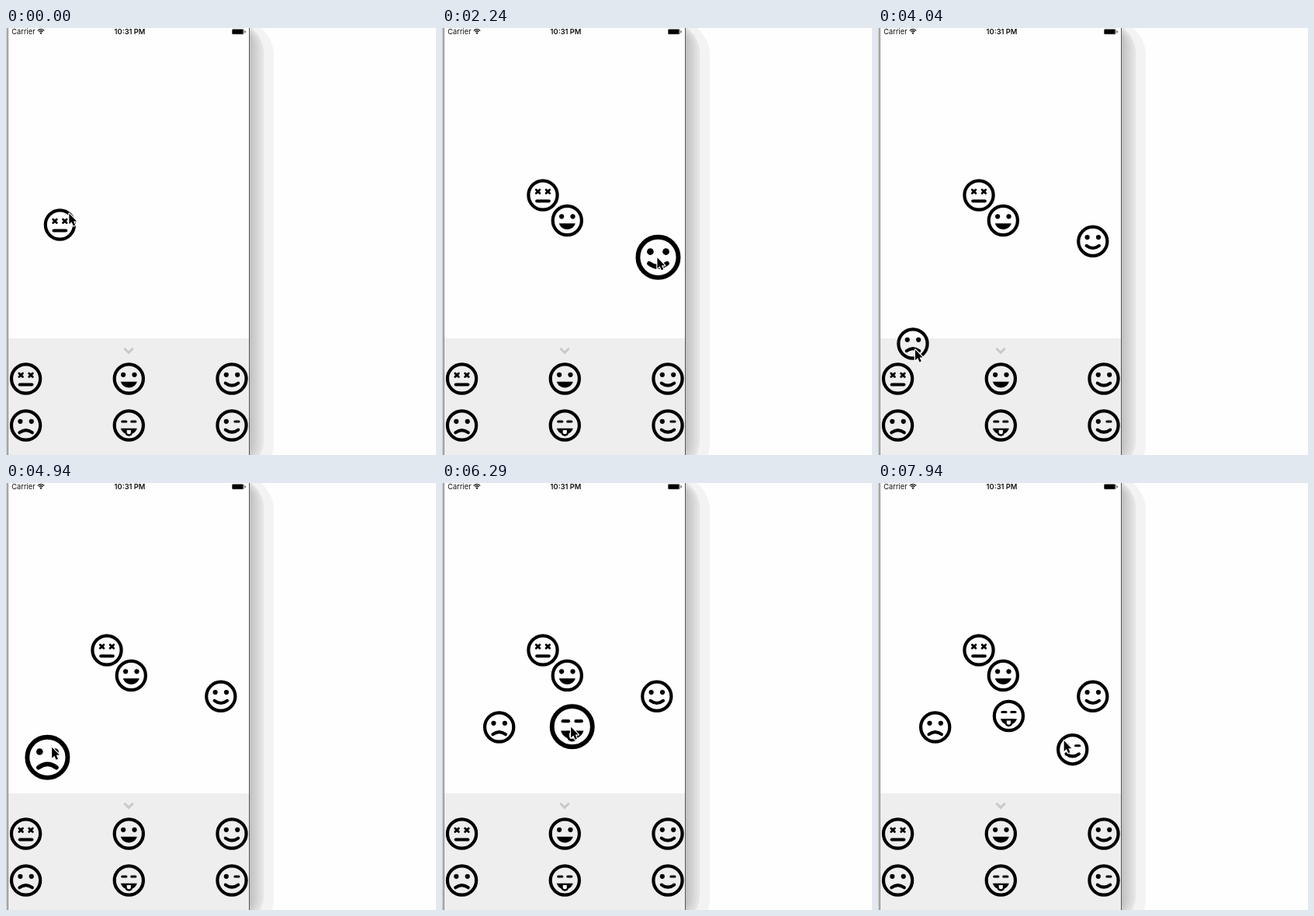
Animation, 554 px wide and 549 px high, one loop 8000 ms. Source, as an HTML page with a canvas:

```html
<!DOCTYPE html>
<html lang="en">
<head>
<meta charset="utf-8">
<title>Emoji drag</title>
<style>
html, body { margin: 0; width: 554px; height: 549px; overflow: hidden; background: #fefefe; }
canvas { display: block; }
</style>
</head>
<body>
<canvas id="stage" width="554" height="549"></canvas>
<script>
const ctx = document.getElementById('stage').getContext('2d');
const LOOP = 8000, TRAVEL = 750;

// Tray slots, three to a row
const kinds = ['dead', 'grin', 'smile', 'sad', 'tongue', 'wink'];
const slot = kind => {
  const i = kinds.indexOf(kind);
  return [25.6 + 132.7 * (i % 3), 451 + 60 * Math.floor(i / 3)];
};

// Each drag carries a face from its slot (or `from`) to a spot.
// `grip` and `release` place the pointer tip relative to the face.
const drags = [
  { kind: 'dead', grab: 0, drop: 290, from: [69.4, 253], to: [130, 215], grip: [11, -15] },
  { kind: 'grin', grab: 900, drop: 1490, to: [161.3, 247.5] },
  { kind: 'smile', grab: 1950, drop: 2390, to: [276.8, 274.3], lift: 0.4 },
  { kind: 'sad', grab: 3300, drop: 3740, to: [45, 406], grip: [-2, -6], release: [2, 7], lift: 0.4 },
  { kind: 'sad', grab: 4800, drop: 5240, from: [45, 406], to: [73.7, 314], grip: [0, -14],
    release: [9, -13], bow: [-7, -4], lift: 0.4 },
  { kind: 'tongue', grab: 5850, drop: 6440, to: [168.4, 299.5], grip: [-11, 0], lift: 0.4 },
  { kind: 'wink', grab: 7200, drop: 7940, to: [250.7, 342.7], grip: [-5, -10], release: [-12, -12], lift: 0.4 }
].map(d => ({ from: slot(d.kind), grip: [-2, 0], release: [-2, 0], bow: [0, 0], lift: 0, ...d }));

const clamp = p => Math.min(1, Math.max(0, p));
const easeOut = p => 1 - (1 - p) ** 2;
const smooth = p => p * p * (3 - 2 * p);
const add = (a, b) => [a[0] + b[0], a[1] + b[1]];
const glide = (a, b, p, bow = [0, 0]) =>
  a.map((v, i) => v + (b[i] - v) * p + bow[i] * Math.sin(Math.PI * p));

const progress = (d, t) => easeOut(clamp((t - d.grab) / (d.drop - d.grab)));
const place = (d, t) => glide(d.from, d.to, progress(d, t), d.bow);

function pointerAt(t) {
  const i = drags.findLastIndex(d => d.grab <= t);
  const now = drags[i], next = drags[i + 1];
  const tip = add(place(now, t), glide(now.grip, now.release, progress(now, t)));
  if (t <= now.drop || !next) return tip;
  const leave = Math.max(now.drop, next.grab - TRAVEL);
  const p = clamp((t - leave) / (next.grab - leave));
  return glide(tip, add(next.from, next.grip), smooth(p), [24, 24]);
}

function line(width, ...pts) {
  ctx.lineWidth = width;
  ctx.beginPath();
  pts.forEach(([x, y]) => ctx.lineTo(x, y));
  ctx.stroke();
}

function dot(x, y, r) {
  ctx.beginPath();
  ctx.arc(x, y, r, 0, Math.PI * 2);
  ctx.fill();
}

function pill(color, x, y, w, h, r) {
  ctx.fillStyle = color;
  ctx.beginPath();
  ctx.roundRect(x, y, w, h, r);
  ctx.fill();
}

function curve(y, bend) {
  ctx.lineWidth = 4.1;
  ctx.beginPath();
  ctx.moveTo(-8.2, y);
  ctx.quadraticCurveTo(0, y + bend, 8.2, y);
  ctx.stroke();
}

const eye = x => dot(x, -5.2, 3.1);
const eyes = () => { eye(-7.2); eye(7.2); };
const dash = x => line(3, [x - 2.6, -5], [x + 2.6, -5]);

function cross(x, y) {
  const r = 2.3;
  line(2.8, [x - r, y - r], [x + r, y + r]);
  line(2.8, [x + r, y - r], [x - r, y + r]);
}

function openMouth() {
  ctx.beginPath();
  ctx.moveTo(-10.5, 3.8);
  ctx.lineTo(10.5, 3.8);
  ctx.bezierCurveTo(7.5, 14, -7.5, 14, -10.5, 3.8);
  ctx.fill();
}

const features = {
  dead() { cross(-6.4, -4.8); cross(6.4, -4.8); line(4.1, [-7.8, 7.5], [7.8, 7.5]); },
  grin() { eyes(); openMouth(); },
  smile() { eyes(); curve(5.6, 6.2); },
  sad() { eyes(); curve(9.2, -6.2); },
  tongue() {
    dash(-6); dash(6);
    openMouth();
    pill('#000', -5, 4, 10, 9.8, [0, 0, 5, 5]);
    pill('#f6f6f6', -2.6, 6, 5.2, 5.2, [0, 0, 2.6, 2.6]);
  },
  wink() { eye(-7.2); dash(6.4); curve(5.6, 6.2); }
};

function face(kind, [x, y], scale = 1) {
  ctx.save();
  ctx.translate(x, y);
  ctx.scale(scale, scale);
  ctx.fillStyle = ctx.strokeStyle = '#000';
  ctx.lineCap = 'round';
  ctx.lineWidth = 4.2;
  ctx.beginPath();
  ctx.arc(0, 0, 18.6, 0, Math.PI * 2);
  ctx.stroke();
  features[kind]();
  ctx.restore();
}

function arrow([x, y]) {
  ctx.save();
  ctx.translate(x + 0.5, y + 0.5);
  ctx.scale(0.92, 0.92);
  ctx.beginPath();
  [[0.5, 0], [0.5, 15], [4, 11.8], [6.4, 17.4], [9, 16.3], [6.6, 10.8], [11, 10.8]]
    .forEach(p => ctx.lineTo(...p));
  ctx.closePath();
  ctx.lineJoin = 'round';
  ctx.lineWidth = 2.6;
  ctx.strokeStyle = '#fff';
  ctx.stroke();
  ctx.fillStyle = '#000';
  ctx.fill();
  ctx.restore();
}

function box(color, x, y, w, h) {
  ctx.fillStyle = color;
  ctx.fillRect(x, y, w, h);
}

function label(text, x, align, weight) {
  ctx.textAlign = align;
  ctx.font = `${weight} 9.3px Inter, "Liberation Sans", sans-serif`;
  ctx.fillText(text, x, 8);
}

function statusBar() {
  ctx.fillStyle = ctx.strokeStyle = '#111';
  label('Carrier', 7.3, 'left', 400);
  label('10:31 PM', 159.5, 'center', 600);
  ctx.lineCap = 'butt';
  ctx.lineWidth = 1.3;
  for (const r of [3.2, 5.5]) {
    ctx.beginPath();
    ctx.arc(45, 7.2, r, -Math.PI * 0.77, -Math.PI * 0.23);
    ctx.stroke();
  }
  dot(45, 6.6, 1.2);
  pill('#999', 291, 1.3, 16, 7, 1.5);
  pill('#000', 291.5, 1.8, 13.8, 6, 1);
  box('#333', 307.6, 3.6, 1.1, 2.4);
}

function phone() {
  box('#fefefe', 0, 0, 554, 549);
  pill('#f3f3f3', -60, -10, 405, 590, 45);
  for (let i = 0; i < 5; i++) {
    const grey = 228 - 8 * i;
    pill(`rgb(${grey} ${grey} ${grey})`, -60, -8 + 2 * i, 392 - 3.6 * i, 578 - 6 * i, 40 - 5 * i);
  }
  box('#c4c4c4', 0, 0, 3, 549);
  box('#808080', 2, 0, 1, 549);
  box('#fefefe', 3, 0, 310, 549);
  box('#555555', 313, 0, 1, 549);
  box('#eeeeee', 3, 399, 310, 150);
  statusBar();
  ctx.strokeStyle = '#c9c9c9';
  line(3, [152.3, 411.8], [158, 417.4], [163.7, 411.8]);
  kinds.forEach(kind => face(kind, slot(kind)));
}

function beat(t) {
  if (t < 290) return t < 150 ? 0 : 150;
  return 140 + 150 * Math.floor((t - 140) / 150);
}

function draw(now) {
  const t = beat(now % LOOP);
  phone();
  for (const kind of kinds) {
    const d = drags.findLast(d => d.kind === kind && d.grab <= t);
    if (d) face(kind, place(d, t), t < d.drop ? 1 + d.lift : 1);
  }
  arrow(pointerAt(t));
}

let start;
function tick(now) {
  start ??= now;
  draw(now - start);
  requestAnimationFrame(tick);
}
draw(0);
requestAnimationFrame(tick);
</script>
</body>
</html>
```
